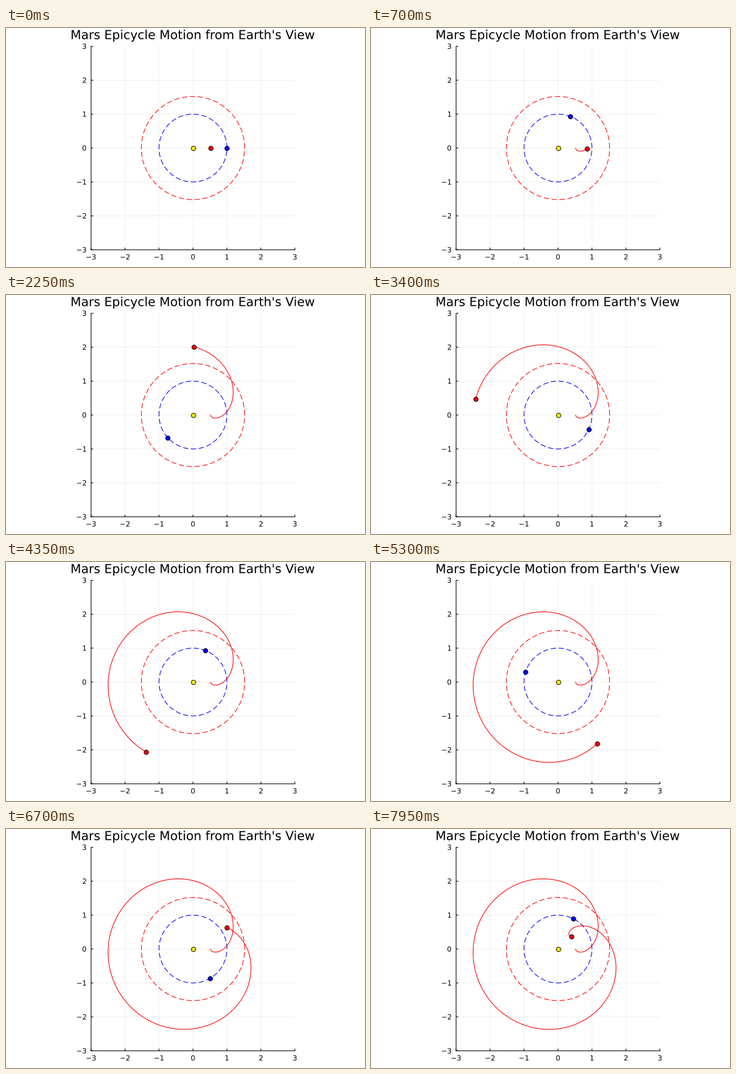
Write a matplotlib script that moves like this. It is 600 by 400 pixels and loops after 8 s.

```python
import numpy as np
import matplotlib.pyplot as plt
from matplotlib.animation import FuncAnimation
from matplotlib.patches import PathPatch
from matplotlib.textpath import TextPath
from matplotlib.transforms import Affine2D

W, H, DPI = 600, 400, 100
FRAMES, STEP_MS = 160, 50
CX, CY, UNIT = 312.5, 200.9, 56.77     # plot centre and pixels per unit
DAYS_PER_FRAME = 5
EARTH_R, EARTH_YEAR = 1.0, 365.25
MARS_R, MARS_YEAR = 1.52, 687.0
PX = 72 / DPI                          # points per pixel
STROKE = 1.1
TITLE_SIZE, TICK_SIZE = 20.74, 11.85

plt.rcParams["font.family"] = "DejaVu Sans"
fig = plt.figure(figsize=(W / DPI, H / DPI), dpi=DPI, facecolor="white")
ax = fig.add_axes([0, 0, 1, 1])
ax.set_xlim(0, W)
ax.set_ylim(H, 0)
ax.axis("off")


def to_px(x, y):
    return CX + UNIT * np.asarray(x), CY - UNIT * np.asarray(y)


def line(x, y, color="black", width=STROKE, **kw):
    return ax.plot(*to_px(x, y), color=color, lw=width * PX, snap=False, **kw)[0]


def label(x, y, text, size, align):
    """Outline text with its baseline at y; align is 0.5 for centre, 1 for right."""
    path = TextPath((0, 0), text, size=size)
    box = path.get_extents()
    place = Affine2D().scale(1, -1).translate(x - box.x0 - align * box.width, y)
    ax.add_patch(PathPatch(path.transformed(place), fc="black", lw=0, snap=False))


def orbit(radius, year, days):
    angle = 2 * np.pi * days / year
    return radius * np.cos(angle), radius * np.sin(angle)


def dashed_circle(radius, color):
    a = np.linspace(0, 2 * np.pi, 361)
    line(radius * np.cos(a), radius * np.sin(a), color,
         linestyle=(0, (8, 4)), dash_capstyle="butt", zorder=3)


def dot(color, zorder):
    return ax.plot(*to_px([0], [0]), "o", ms=7.4 * PX, mfc=color, mec="black",
                   mew=1.0 * PX, snap=False, zorder=zorder)[0]


# Grid, axes, ticks and labels
tick = 3.6 / UNIT
for v in range(-3, 4):
    if abs(v) < 3:
        line([v, v], [-3, 3], width=0.6, alpha=0.1, zorder=1)
        line([-3, 3], [v, v], width=0.6, alpha=0.1, zorder=1)
    line([v, v], [-3, -3 + tick], zorder=2, solid_capstyle="butt")
    line([-3, -3 + tick], [v, v], zorder=2, solid_capstyle="butt")
    name = str(v).replace("-", "\u2212")
    px, py = to_px(v, v)
    label(px, 387.4, name, TICK_SIZE, 0.5)
    label(133.8, py + 4.3, name, TICK_SIZE, 1)
line([-3, 3], [-3, -3], zorder=2, solid_capstyle="projecting")
line([-3, -3], [-3, 3], zorder=2, solid_capstyle="projecting")
label(CX, 18.6, "Mars Epicycle Motion from Earth's View", TITLE_SIZE, 0.5)

dashed_circle(EARTH_R, "blue")
dashed_circle(MARS_R, "red")

days = np.arange(FRAMES) * DAYS_PER_FRAME
ex, ey = orbit(EARTH_R, EARTH_YEAR, days)
mx, my = orbit(MARS_R, MARS_YEAR, days)
earth_x, earth_y = to_px(ex, ey)
seen_x, seen_y = to_px(mx - ex, my - ey)

trail = line([], [], "red", zorder=4)
sun = dot("yellow", 5)
earth = dot("blue", 6)
mars = dot("red", 7)


def draw(i):
    trail.set_data(seen_x[:i + 1], seen_y[:i + 1])
    earth.set_data([earth_x[i]], [earth_y[i]])
    mars.set_data([seen_x[i]], [seen_y[i]])
    return trail, earth, mars


anim = FuncAnimation(fig, draw, frames=FRAMES, interval=STEP_MS,
                     init_func=lambda: draw(0), repeat=True, repeat_delay=0)
plt.show()
```
